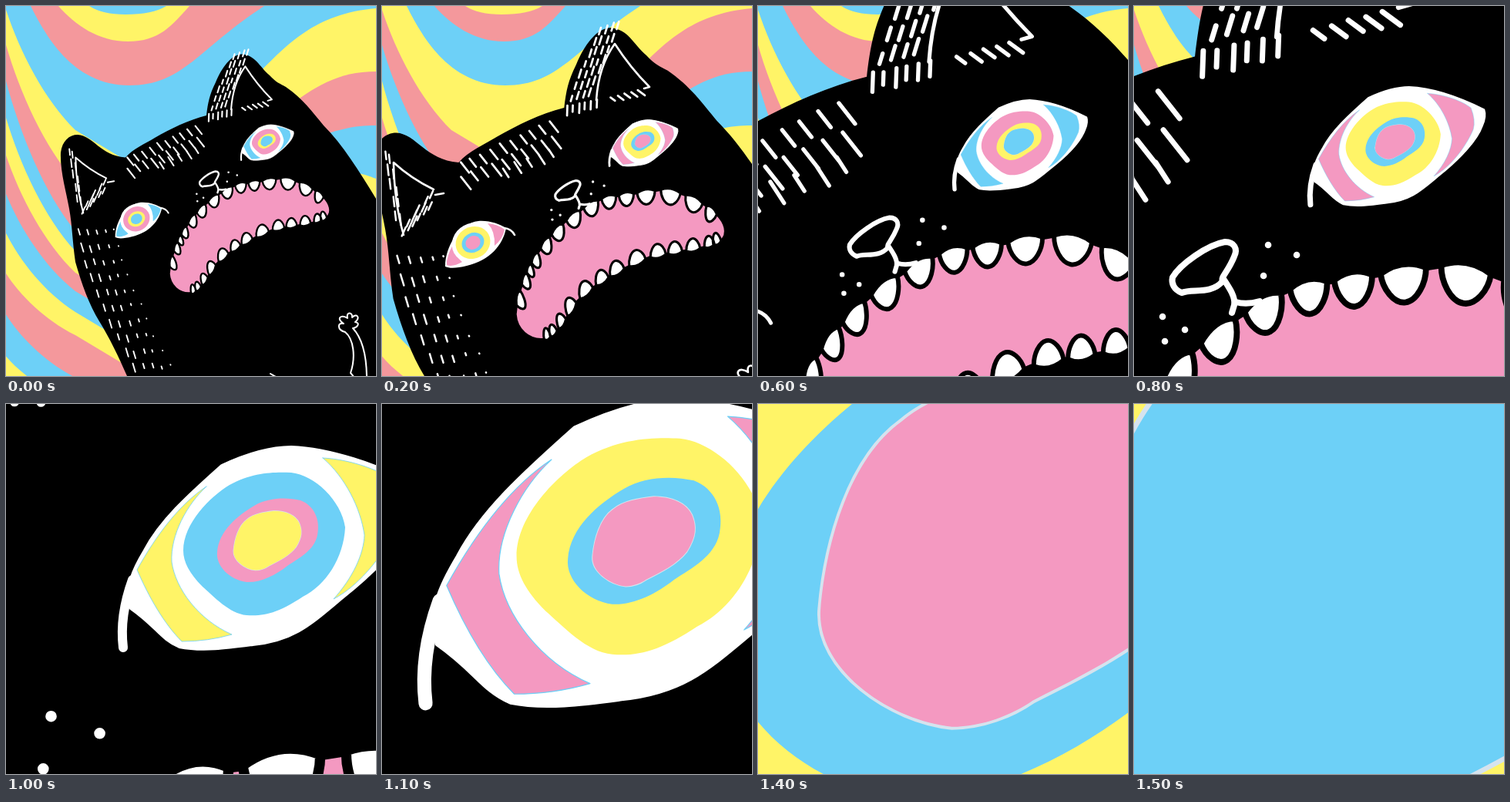
An HTML page with a canvas that plays this animation: 480 px wide and 480 px high, repeating every 1.6 s.

```html
<!DOCTYPE html>
<html lang="en">
<head>
<meta charset="utf-8">
<title>Into the eye</title>
<style>
html, body { margin: 0; width: 100%; height: 100%; overflow: hidden; background: #000; }
canvas { display: block; }
svg { position: absolute; width: 0; height: 0; }
</style>
</head>
<body>
<svg>
  <path id="upper" d="M95 506C98 470 112 425 145 378C175 335 220 302 262 285C300 277 340 274 380 267C410 272 455 290 480 315"/>
  <path id="lower" d="M488 366C455 385 400 385 350 398C300 418 250 445 215 480C195 505 180 545 150 554"/>
</svg>
<canvas id="stage" width="480" height="480"></canvas>
<script>
const ctx = document.getElementById('stage').getContext('2d');
const BLUE = '#6dd0f7', YELLOW = '#fff467', WHITE = '#fff', ROSE = '#f499c1';
const STRIPES = [YELLOW, '#f4989c', BLUE];
const EYE = [BLUE, ROSE, YELLOW];
const FOCUS = [338, 175];
const STEP = 100, STEPS = 16;
// [step, zoom], interpolated exponentially
const ZOOM = [[0, 1], [2, 1.304], [4, 1.92], [8, 3.32], [10, 5.66], [12, 12.96], [15, 55]];
let zoom = 1;

// Places artwork that was laid out at the given magnification.
function layer(scale) {
  const k = zoom / scale;
  ctx.setTransform(k, 0, 0, k, FOCUS[0] * (1 - k), FOCUS[1] * (1 - k));
}
function fill(path, color) {
  ctx.fillStyle = color;
  ctx.fill(new Path2D(path));
}
function line(path, width, color = WHITE) {
  ctx.strokeStyle = color;
  ctx.lineWidth = width;
  ctx.stroke(new Path2D(path));
}
function ellipse(x, y, rx, ry, color) {
  ctx.fillStyle = color;
  ctx.beginPath();
  ctx.ellipse(x, y, rx, ry, -0.5, 0, 7);
  ctx.fill();
}

// Background: fixed bands whose colours rotate
const ARCS = [
  [1, 'M32 0C50 35 85 103 160 103C230 103 250 55 335 0Z'],
  [0, 'M68 0C90 25 120 46 158 46C200 46 215 25 238 0Z'],
  [2, 'M108 0Q125 11 155 11Q190 11 208 0Z'],
  [0, 'M325 90C365 50 400 10 480 3V300H325Z'],
  [1, 'M360 135C400 105 430 85 480 85V300H360Z'],
  [2, 'M390 175C430 160 450 155 480 155V300H390Z'],
  [0, 'M420 220C450 212 465 218 480 224V300H420Z']
];
const SWEEP_ENDS = [161, 228, 292, 318, 346, 370, 397, 427, 482, 515];
const SWEEPS = SWEEP_ENDS.map((end, k) => {
  const y = 5 + 45 * k + 0.55 * k * k, drop = end - y;
  return `M0 ${y}C18 ${y + drop * 0.35} 50 ${y + drop * 0.75} 90 ${end}l75 45V560H0Z`;
});
function background(phase) {
  const color = k => STRIPES[(k + phase) % 3];
  ctx.setTransform(1, 0, 0, 1, 0, 0);
  ctx.fillStyle = color(2);
  ctx.fillRect(0, 0, 480, 480);
  for (const [k, path] of ARCS) fill(path, color(k));
  SWEEPS.forEach((path, k) => fill(path, color(k)));
}

const BODY = `M157 480C146 455 134 430 121 409C108 388 98 360 90 332C86 305 86 285 82 263
  C78 240 70 215 71 190C73 175 82 167 93 167C113 168 122 194 155 196.5C165 185 180 179 193 171
  C214 159 236 148 260 142C262 125 264 115 272 99C280 80 292 63 306 62.5C324 64 328 78 342 90
  C350 99 356 101 363 105C385 120 398 138 412 155C437 180 458 214 480 250L520 320V520H170Z`;
const EARS = `M278 122Q281 78 302 49Q322 80 347 105l-7 2
  M28 297Q16 255 15 203Q38 224 67 238M80 243l-11 2`;
const ARM = `M440 423C429 420 430 410 438 412C428 406 434 399 443 405C441 396 450 397 449 404
  C455 398 460 404 453 410C460 411 456 417 450 418C463 432 468 455 468 484
  M440 423C451 432 454 455 447 476l5 6M343 477l7 4`;

// Fur: loose grids of short hairs
let seed = 7;
const random = () => (seed = seed * 16807 % 2147483647) / 2147483647;
function fur(rows, cols, hair) {
  let path = '';
  for (let r = 0; r < rows; r++) for (let c = 0; c < cols; c++) {
    const [x, y, dx, dy] = hair(r, c), length = 0.75 + random() / 2;
    path += `M${x + random() * 3} ${y + random() * 4}l${dx * length} ${dy * length}`;
  }
  return path;
}
const FLANK = fur(10, 5, (r, c) =>
  [91 + 72 * (r / 9) ** 1.3 + 12 * c, 288 + 19.5 * r, 3 - 0.7 * c, 10 - 2.4 * c]);
const LEFT_EAR = fur(5, 2, (r, c) => [80 + 2.5 * r + 5 * c, 182 + 15 * r + 5 * c, 1, 9])
  + fur(2, 6, (r, c) => [98 + 5 * c + 3 * r, 267 - 5 * c - 10 * r, 4, -9]);
const CROWN = fur(2, 10, (r, c) => [-12 + 19 * c + 3 * r, 215 - 8.8 * c + 27 * r, 15, 19])
  + fur(1, 5, (r, c) => [70 + 22 * c, 224 - 9 * c, 11, 17]);
const RIGHT_EAR = fur(7, 4, (r, c) => [198 + 9 * r + 12 * c, 96 - 21 * r - 3 * c, 4, -13]);
const EAR_BASE = fur(1, 6, (r, c) => [87 + 20 * c, 58 - 4 * c, -1, 27])
  + fur(1, 5, (r, c) => [232 + 22 * c, 29 - 6 * c, 19, 14]);

// Mouth: teeth sit on the lips at these distances along them
const upper = document.getElementById('upper'), lower = document.getElementById('lower');
const MOUTH = upper.getAttribute('d') + 'C495 330 504 352 488 366'
  + lower.getAttribute('d').replace('M', 'L') + 'C120 557 97 535 95 506Z';
function teeth(lip, spots, pull) {
  return spots.map((at, i) => {
    const gap = ((spots[i + 1] ?? at + 34) - (spots[i - 1] ?? at - 34)) / 2;
    const half = gap * 0.4, height = 11 + gap * 0.3;
    const a = lip.getPointAtLength(at - half), b = lip.getPointAtLength(at + half);
    const mx = (a.x + b.x) / 2, my = (a.y + b.y) / 2;
    const width = Math.hypot(b.x - a.x, b.y - a.y);
    const tx = (b.x - a.x) / width, ty = (b.y - a.y) / width;
    const size = height / Math.hypot(ty, tx + pull);
    const vx = -ty * size, vy = (tx + pull) * size;
    // Point given by shares along the base (from its middle) and towards the tip
    const p = (u, v) => `${mx + (b.x - a.x) * u + vx * v} ${my + (b.y - a.y) * u + vy * v} `;
    return `M${p(-0.5, 0)}C${p(-0.48, 0.5)}${p(-0.25, 1)}${p(0, 1)}`
      + `C${p(0.25, 1)}${p(0.48, 0.5)}${p(0.5, 0)}Q${p(0, -0.4)}${p(-0.5, 0)}Z`;
  }).join('');
}
const TEETH = teeth(upper, [32, 70, 92, 115, 150, 185, 225, 265, 302, 336, 374, 422, 470, 512], 1)
  + teeth(lower, [6, 24, 56, 91, 124, 166, 209, 242, 280, 322, 355, 380, 398], -1);

const NOSE = `M50 352C60 335 95 310 118 306C130 306 135 315 130 325C122 345 112 352 115 357
  C100 375 75 366 62 372C52 368 48 360 50 352ZM116 354C124 366 132 378 130 388l-3 10M132 384Q146 388 163 383`;
const WHISKERS = 'M174 310h.1M211 323h.1M168 350h.1M37 403h.1M66 420h.1M40 435h.1';

const RIGHT = {
  white: `M162 265C155 235 165 215 180 190C200 152 235 120 280 80C310 66 340 56 370 56C420 58 480 78 536 106
    Q541 120 532 141C520 175 480 215 450 240C400 280 380 306 320 312C290 316 255 321 225 315C200 304 195 288 162 265Z`,
  corners: `M260 107C225 130 195 170 170 215C185 250 205 285 228 308Q262 308 293 299
    C250 280 220 240 215 205C213 170 235 130 260 107Z
    M411 70C450 72 490 88 507 102Q518 130 512 150C495 190 460 235 425 253C450 225 464 195 465 170C460 135 440 95 411 70Z`,
  iris: `M230 190C230 155 265 120 290 105C320 88 350 88 370 89C400 92 435 125 440 160C438 200 415 235 385 250
    C355 270 335 276 312 274C290 272 270 250 255 237C238 220 230 205 230 190Z`,
  ring: `M274 192C276 165 300 145 322 132C340 121 365 121 382 125C400 132 408 150 404 170
    C400 190 380 200 365 210C350 222 330 232 312 231C290 228 272 210 274 192Z`,
  pupil: `M240 210C243 175 255 135 280 117C300 100 330 96 360 92C395 92 425 105 435 128C444 150 444 170 425 200
    C405 225 375 240 345 255C335 262 320 268 305 268C275 265 238 240 240 210Z`
};
function eyes(phase) {
  const color = k => EYE[(phase + k) % 3];

  layer(1.304);
  fill('M82 338C82 312 100 282 125 279C140 278 152 283 161 288C157 310 140 330 110 337C98 340 88 341 82 338Z', WHITE);
  line('M158 288Q168 289 172 297', 2.6);
  fill('M84 331Q88 314 94 308Q92 322 104 332Q92 339 84 336ZM137 282Q150 283 159 290Q157 302 146 311Q147 292 137 282Z', color(0));
  ellipse(118, 307, 28, 25, WHITE);
  ellipse(118, 307, 23, 20.5, color(1));
  ellipse(118, 307, 15, 12.5, color(2));
  ellipse(118, 307, 10, 8.5, color(0));

  layer(5.66);
  fill(RIGHT.white, WHITE);
  line(RIGHT.white, 4);
  line('M152 316Q147 275 164 228', 12);
  fill(RIGHT.corners, color(0));
  line(RIGHT.corners, 0.8, BLUE);
  fill(RIGHT.iris, color(1));
  fill(RIGHT.ring, color(2));
  layer(12.96);
  line(RIGHT.pupil, 3, '#d5e3ee');
  fill(RIGHT.pupil, color(0));
}

function cat(phase) {
  layer(1);
  fill(BODY, '#000');
  line(ARM, 2);
  line(FLANK + LEFT_EAR, 1.9);

  layer(1.304);
  line(EARS, 2.6);

  layer(1.92);
  line(CROWN + RIGHT_EAR, 4);
  fill(MOUTH, ROSE);
  line(MOUTH, 5, '#000');
  fill(TEETH, WHITE);
  line(TEETH, 4.5, '#000');

  layer(3.32);
  line(EAR_BASE, 7);
  line(NOSE, 8);
  line(WHISKERS, 8.5);
  eyes(phase);
}

function zoomAt(step) {
  const i = ZOOM.findIndex(([s], k) => k > 0 && step <= s);
  const [s0, z0] = ZOOM[i - 1], [s1, z1] = ZOOM[i];
  return z0 * (z1 / z0) ** ((step - s0) / (s1 - s0));
}

function render(now) {
  const step = Math.floor(now / STEP) % STEPS;
  const phase = step * 2 % 3;
  zoom = zoomAt(step);
  ctx.lineCap = ctx.lineJoin = 'round';
  background(phase);
  cat(phase);
}

const start = performance.now();
function tick() {
  render(performance.now() - start);
  requestAnimationFrame(tick);
}
tick();
</script>
</body>
</html>
```
